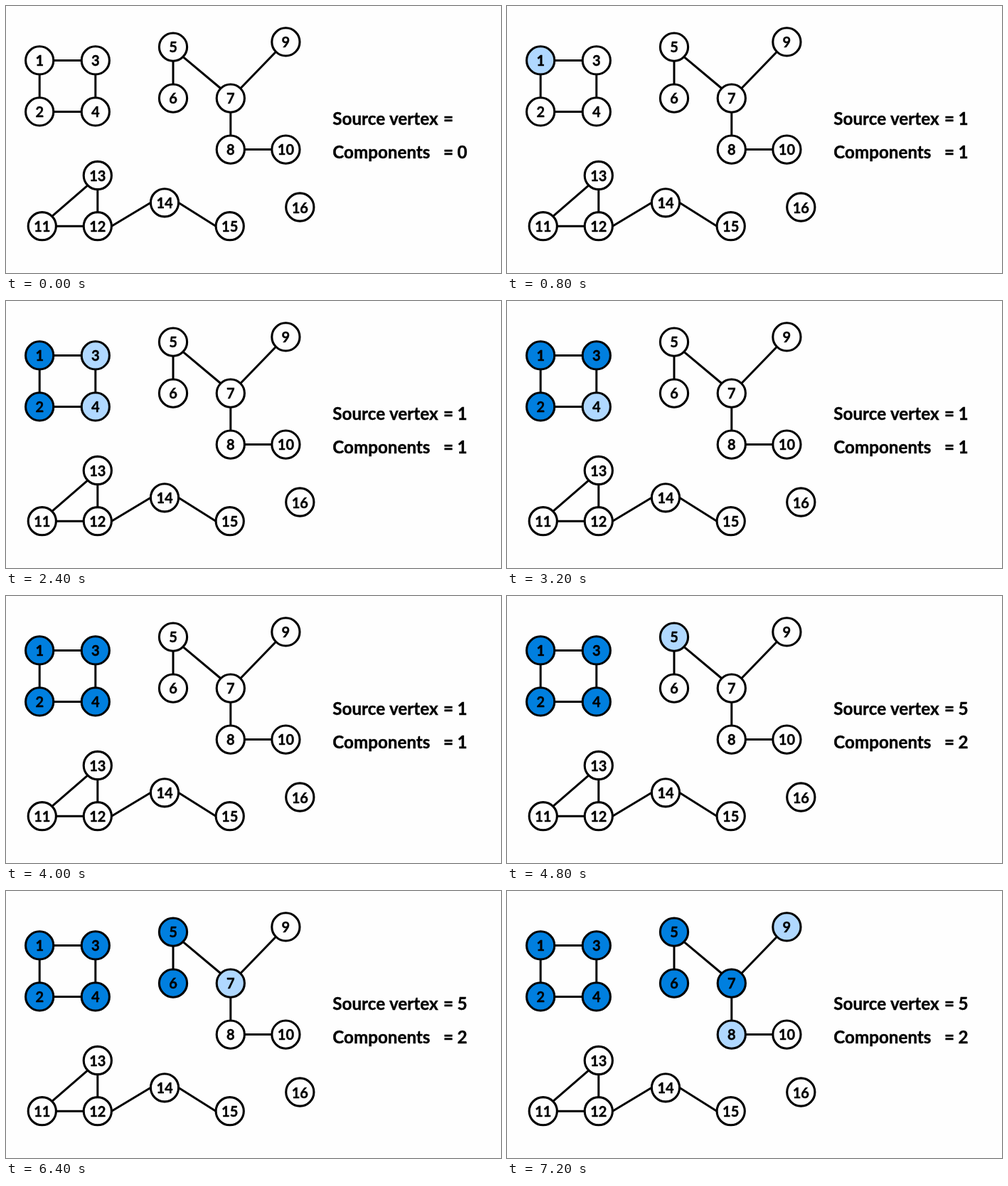
Animation, 696 px wide and 375 px high, one loop 8000 ms. Source, as an HTML page with a canvas:

```html
<!DOCTYPE html>
<html lang="en">
<head>
<meta charset="utf-8">
<title>Connected components by breadth-first search</title>
<style>
html, body { margin: 0; width: 100%; height: 100%; overflow: hidden; background: #fefefe; }
canvas { display: block; width: 696px; height: 375px; }
</style>
</head>
<body>
<canvas id="stage" width="696" height="375"></canvas>
<script>
const ctx = document.getElementById("stage").getContext("2d");
const STEP = 800, STEPS = 10;
const RADIUS = 19.6, COLUMN = 78.6, ROW = 72;
const WHITE = "#fefefe", QUEUED = "#b0d8ff", VISITED = "#007fdf";

const nodes = [];
const edges = [];

function addNode(x, y, labelShift = 0) {
  nodes.push({ id: nodes.length + 1, x, y, labelShift, links: [] });
}

function connect(...path) {
  for (let i = 1; i < path.length; i++) {
    const a = nodes[path[i - 1] - 1], b = nodes[path[i] - 1];
    edges.push([a, b]);
    a.links.push(b);
    b.links.push(a);
  }
}

function buildGraph() {
  // Square
  for (let i = 0; i < 4; i++) addNode(47.2 + COLUMN * (i >> 1), 76.4 + ROW * (i % 2));

  // Tree
  const left = 235, middle = 315.8, right = middle + COLUMN - 1, top = 57.6;
  addNode(left, top);
  addNode(left, top + ROW);
  addNode(middle, top + ROW);
  addNode(middle, top + 2 * ROW);
  addNode(right, top - ROW / 10);
  addNode(right, top + 2 * ROW);

  // Triangle with a tail
  const base = 309.2, corner = 50.8 + COLUMN - 0.6;
  addNode(corner - COLUMN + 0.6, base, 1);
  addNode(corner, base, 1);
  addNode(corner, base - ROW + 0.8, 1);
  addNode(223, 276.3, 1);
  addNode(314.7, base, 1);

  // Isolated vertex
  addNode(413.3, 282.5, 1);

  connect(1, 2, 4, 3, 1);
  connect(6, 5, 7, 8, 10);
  connect(7, 9);
  connect(11, 12, 13, 11);
  connect(12, 14, 15);
  for (const node of nodes) node.links.sort((a, b) => a.id - b.id);
}

// State of the search after a number of steps
function search(steps) {
  const queue = [], fills = new Map();
  let source = "", components = 0;
  const enqueue = node => {
    fills.set(node, QUEUED);
    queue.push(node);
  };
  for (let i = 0; i < steps; i++) {
    if (queue.length) {
      const node = queue.shift();
      fills.set(node, VISITED);
      node.links.filter(next => !fills.has(next)).forEach(enqueue);
    } else {
      const start = nodes.find(node => !fills.has(node));
      enqueue(start);
      source = start.id;
      components++;
    }
  }
  return { fills, source, components };
}

function text(str, x, y, size, align) {
  ctx.font = `bold ${size}px Lato, sans-serif`;
  ctx.textAlign = align;
  ctx.fillStyle = "#000";
  ctx.lineWidth = 0.4;
  ctx.fillText(str, x, y);
  ctx.strokeText(str, x, y);
}

// Connectors attach at the nearest of eight points on each circle
function drawEdge(a, b) {
  const eighth = Math.PI / 4;
  const angle = Math.round(Math.atan2(b.y - a.y, b.x - a.x) / eighth) * eighth;
  const dx = RADIUS * Math.cos(angle), dy = RADIUS * Math.sin(angle);
  ctx.lineWidth = 3;
  ctx.beginPath();
  ctx.moveTo(a.x + dx, a.y + dy);
  ctx.lineTo(b.x - dx, b.y - dy);
  ctx.stroke();
}

function drawNode(node, fill) {
  ctx.beginPath();
  ctx.arc(node.x, node.y, RADIUS, 0, Math.PI * 2);
  ctx.fillStyle = fill;
  ctx.fill();
  ctx.lineWidth = 3.1;
  ctx.stroke();
  text(node.id, node.x, node.y + 7.1 + node.labelShift, 20, "center");
}

function drawStatus(label, value, y) {
  const size = 24.2;
  text(label, 459.3, y, size, "left");
  text("=", 622, y, size, "center");
  text(value, 641.5, y, size, "center");
}

function draw(step) {
  const { fills, source, components } = search(step);
  ctx.fillStyle = WHITE;
  ctx.fillRect(0, 0, 696, 375);
  ctx.strokeStyle = "#000";
  for (const [a, b] of edges) drawEdge(a, b);
  for (const node of nodes) drawNode(node, fills.get(node) || WHITE);
  drawStatus("Source vertex", source, 166.7);
  drawStatus("Components", components, 214.2);
}

function frame() {
  draw(Math.floor(performance.now() / STEP) % STEPS);
  requestAnimationFrame(frame);
}

buildGraph();
frame();
</script>
</body>
</html>
```
